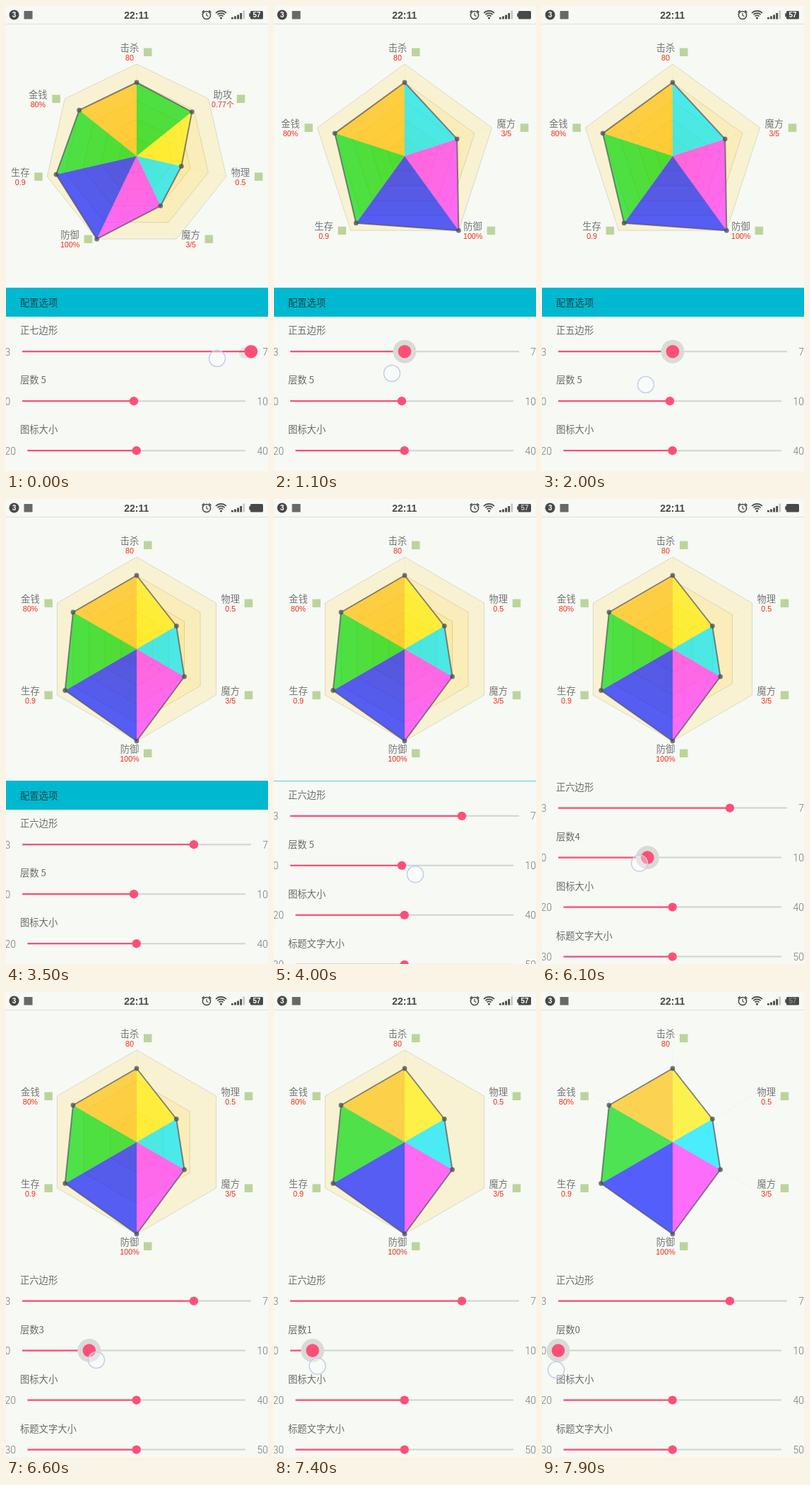
Recreate the animation shown at these times as an HTML page with a canvas. Size 371x657 px, loop 8000 ms.

```html
<!DOCTYPE html>
<html lang="zh-CN">
<head>
<meta charset="utf-8">
<title>Radar chart settings</title>
<style>
  html, body { margin: 0; width: 100%; height: 100%; overflow: hidden; background: #f6f9f4; }
  canvas { display: block; width: 371px; height: 657px; }
</style>
</head>
<body>
<canvas id="stage"></canvas>
<script>
const W = 371, H = 657, LOOP = 8000, STEP = 100;
const CX = 185, CY = 212, RADIUS = 130;
const LIST_TOP = 398, SCROLL = 51.6;
const CJK = '"Noto Sans CJK SC", "Noto Sans CJK", sans-serif';
const SANS = '"Liberation Sans", "Noto Sans CJK SC", sans-serif';
const LIGHT = 'Roboto, sans-serif';
const INK = '#484848', PINK = '#ff4f78';

const canvas = document.getElementById('stage');
const ctx = canvas.getContext('2d');
const ratio = window.devicePixelRatio || 1;
canvas.width = W * ratio;
canvas.height = H * ratio;

// Clockwise from the top; each colour fills the sector that ends at its vertex.
const AXES = [
  { name: '击杀', value: '80', size: .8, color: '#ffc211' },
  { name: '助攻', value: '0.77个', size: .77, color: '#07db0f' },
  { name: '物理', value: '0.5', size: .5, color: '#fff00a' },
  { name: '魔方', value: '3/5', size: .6, color: '#00e9ff' },
  { name: '防御', value: '100%', size: 1, color: '#ff33ff' },
  { name: '生存', value: '0.9', size: .9, color: '#101eff' },
  { name: '金钱', value: '80%', size: .8, color: '#07db0f' },
];

// Finger gestures as [time, x, y] points.
const GESTURES = [
  { end: 3300, path: [[300, 299, 498], [800, 120, 510], [1100, 167, 519],
                      [2000, 147, 535], [2400, 105, 538], [3100, 262, 536]] },
  { end: 4400, path: [[3600, 200, 560], [4300, 200, 508]] },
  { end: 5100, path: [[4800, 150, 505]] },
  { end: LOOP, path: [[5500, 150, 508], [6600, 128, 520], [7900, 20, 534]] },
];

const clamp = (v, lo, hi) => Math.min(hi, Math.max(lo, v));
const progress = (t, from, to) => clamp((t - from) / (to - from), 0, 1);
const mix = (a, b, k) => a + (b - a) * k;

function along(path, t) {
  let i = 1;
  while (i < path.length - 1 && t > path[i][0]) i++;
  const a = path[i - 1], b = path[i] || a;
  const k = a === b ? 0 : progress(t, a[0], b[0]);
  return { x: mix(a[1], b[1], k), y: mix(a[2], b[2], k) };
}

function fingerAt(t) {
  const gesture = GESTURES.find(g => t < g.end);
  const early = gesture !== GESTURES[0] && t < gesture.path[0][0];
  return early ? null : along(gesture.path, t);
}

function stateAt(t) {
  const finger = fingerAt(t);
  const snap = (step, lo, hi) => clamp(Math.round(lo + (finger.x - 23) / step), lo, hi);
  return {
    t, finger,
    sides: t < 400 ? 7 : t < 3300 ? snap(81, 3, 7) : 6,
    layers: t < 4900 ? 5 : t < 5500 ? 4 : snap(31.6, 0, 10),
    pressed: t < 3300 ? 0 : t >= 5500 ? 1 : -1,
    scroll: SCROLL * Math.sin(progress(t, 3600, 4300) * Math.PI / 2),
  };
}

function text(str, x, y, font, color, align = 'left') {
  ctx.font = font;
  ctx.fillStyle = color;
  ctx.textAlign = align;
  ctx.fillText(str, x, y);
}

function disc(x, y, r, color) {
  ctx.fillStyle = color;
  ctx.beginPath();
  ctx.arc(x, y, r, 0, 7);
  ctx.fill();
}

function line(points, color, width, closed) {
  trace(points, closed);
  ctx.strokeStyle = color;
  ctx.lineWidth = width;
  ctx.stroke();
}

function trace(points, closed) {
  ctx.beginPath();
  points.forEach(p => ctx.lineTo(...p));
  if (closed) ctx.closePath();
}

function fillShape(points, color) {
  trace(points, true);
  ctx.fillStyle = color;
  ctx.fill();
}

function drawLabel(axis, [vx, vy]) {
  const side = Math.abs(vx - CX) < 1 ? 0 : Math.sign(vx - CX);
  const x = vx + (side > 0 ? 20.2 : side < 0 ? -38 : -10);
  const y = side ? vy : vy + 17 * Math.sign(vy - CY);
  text(axis.name, x, y - 1, '13.3px ' + CJK, '#777', 'center');
  text(axis.value, x, y + 12, '10.7px ' + SANS, '#f02b14', 'center');
  ctx.fillStyle = '#bcd49c';
  ctx.fillRect(x + 20, y - 5.5, 11.5, 11.5);
}

function drawChart({ sides, layers }) {
  const axes = [AXES[0], ...AXES.slice(AXES.length - sides + 1)];
  const point = (i, r) => {
    const a = 2 * Math.PI * i / sides;
    return [CX + RADIUS * r * Math.sin(a), CY - RADIUS * r * Math.cos(a)];
  };
  for (let n = layers; n > 0; n--) {
    const ring = axes.map((_, i) => point(i, n / layers));
    fillShape(ring, 'rgba(255,213,79,.2)');
    line(ring, 'rgba(110,110,90,.3)', .7, true);
  }
  axes.forEach((_, i) => line([[CX, CY], point(i, 1)], 'rgba(190,200,200,.2)', .6));

  const corners = axes.map((axis, i) => point(i, axis.size));
  ctx.globalAlpha = .7;
  axes.forEach((axis, i) => {
    fillShape([[CX, CY], corners.at(i - 1), corners[i]], axis.color);
  });
  ctx.globalAlpha = 1;
  line(corners, 'rgba(85,85,95,.7)', 2, true);
  corners.forEach(([x, y]) => disc(x, y, 3.4, 'rgba(75,78,88,.75)'));
  axes.forEach((axis, i) => drawLabel(axis, point(i, 1)));
}

function drawSlider(row, pressed, t) {
  const { y, title, min, max, left, right, value } = row;
  const x = mix(left, right, (value - min) / (max - min));
  text(title, 20, y - 25, '13.3px ' + CJK, '#6c6c6c');
  text(min, -1.5, y + 5.5, '300 14px ' + LIGHT, '#777');
  text(max, W, y + 5.5, '300 14px ' + LIGHT, '#777', 'right');
  line([[left, y], [right, y]], '#d0d4cf', 2);
  line([[left, y], [x, y]], PINK, 2.2);
  if (pressed) {
    if (t < 300) disc(338, y + 2, 8, 'rgba(0,0,0,.08)');
    else disc(x, y, 16.5, '#d8dbd6');
  }
  disc(x, y, pressed ? 9.3 : 6.2, PINK);
}

function drawList({ t, sides, layers, pressed, scroll }) {
  const gap = t < 4900 ? ' ' : '';
  const rows = [
    { title: `正${'三四五六七'[sides - 3]}边形`, min: 3, max: 7, left: 23, right: 347, value: sides },
    { title: `层数${gap}${layers}`, min: 0, max: 10, left: 23, right: 339, value: layers },
    { title: '图标大小', min: 20, max: 40, left: 30.5, right: 339, value: 30 },
    { title: '标题文字大小', min: 30, max: 50, left: 30.5, right: 339, value: 40 },
  ];
  ctx.save();
  ctx.beginPath();
  ctx.rect(0, LIST_TOP, W, H - LIST_TOP);
  ctx.clip();
  ctx.translate(0, -scroll);
  ctx.fillStyle = '#00b8cf';
  ctx.fillRect(0, LIST_TOP, W, 41);
  text('配置选项', 20, 423.5, '13.3px ' + CJK, 'rgba(30,30,30,.75)');
  rows.forEach((row, i) => drawSlider({ ...row, y: 488.2 + 70 * i }, i === pressed, t));
  ctx.restore();
}

function drawFinger({ finger }) {
  if (!finger) return;
  disc(finger.x, finger.y, 11.5, 'rgba(255,255,255,.35)');
  ctx.strokeStyle = '#c3cfe9';
  ctx.lineWidth = 1.5;
  ctx.stroke();
}

function arc(x, y, r, from, to, width) {
  ctx.beginPath();
  ctx.arc(x, y, r, from * Math.PI, to * Math.PI);
  ctx.strokeStyle = INK;
  ctx.lineWidth = width;
  ctx.stroke();
}

function drawStatusBar(t) {
  line([[0, 25.5], [W, 25.5]], '#dcdfdb', 1);
  disc(11.5, 12.5, 7, INK);
  text('3', 11.5, 16, 'bold 10px ' + SANS, '#fff', 'center');
  ctx.fillStyle = '#686868';
  ctx.fillRect(25.5, 7, 12, 11.5);
  text('22:11', 184.7, 17.8, 'bold 14px ' + SANS, INK, 'center');

  // Alarm clock
  arc(284, 13, 5.6, 0, 2, 1.5);
  line([[284, 9.8], [284, 13.3], [286.5, 14.5]], INK, 1.2);
  line([[277.6, 9.2], [280.6, 6.4]], INK, 1.7);
  line([[287.4, 6.4], [290.4, 9.2]], INK, 1.7);

  // Wi-Fi
  disc(304.5, 17, 1.6, INK);
  [4.2, 7.4, 10.6].forEach(r => arc(304.5, 17.5, r, 1.25, 1.75, 1.7));

  // Signal
  [2.5, 4, 6, 8.5, 12].forEach((h, i) => {
    ctx.fillStyle = i < 4 ? INK : '#c6c9c5';
    ctx.fillRect(319 + 4.1 * i, 18.5 - h, 2.8, h);
  });

  // Battery: its figure fades away once in each charging cycle
  ctx.fillStyle = INK;
  ctx.fillRect(344.3, 10.3, 2, 5);
  ctx.beginPath();
  ctx.roundRect(346, 7, 18, 11.5, 1.5);
  ctx.fill();
  const phase = t % 2400;
  ctx.globalAlpha = 1 - progress(phase, 500, 800) + progress(phase, 1400, 1700);
  text('57', 355, 16.4, 'bold 10px ' + SANS, '#fff', 'center');
  ctx.globalAlpha = 1;
}

function draw(t) {
  const state = stateAt(t);
  ctx.setTransform(ratio, 0, 0, ratio, 0, 0);
  ctx.lineJoin = 'round';
  ctx.fillStyle = '#f6f9f4';
  ctx.fillRect(0, 0, W, H);
  drawChart(state);
  drawList(state);
  drawFinger(state);
  drawStatusBar(t);
}

// The screen refreshes ten times a second.
const start = performance.now();
function tick() {
  const t = (performance.now() - start) % LOOP;
  draw(Math.floor(t / STEP) * STEP);
  requestAnimationFrame(tick);
}
tick();
</script>
</body>
</html>
```
